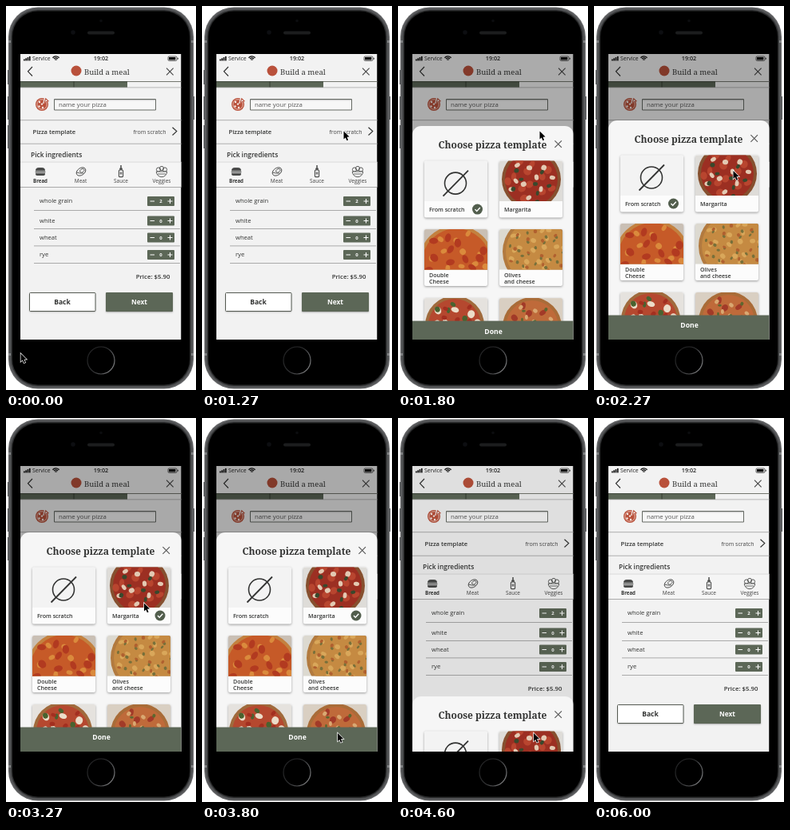
These frames come from a looping animation (238x480 px, 6.54 s). An HTML page with a canvas:

```html
<!DOCTYPE html>
<html lang="en">
<head>
<meta charset="utf-8">
<title>Build a meal</title>
<style>
html, body { margin: 0; width: 100%; height: 100%; overflow: hidden; background: #fff; }
canvas { display: block; width: 100vw; height: 100vh; }
</style>
</head>
<body>
<canvas id="stage"></canvas>
<script>
const W = 238, H = 480, LOOP = 6540;
const GREEN = '#5c6757', INK = '#333433', RED = '#b9513b', ICON = '#4b4c4b';
const SANS = '"Open Sans", "Noto Sans", sans-serif';
const SERIF = '"Noto Serif", serif';
const SCREEN = { x: 18, y: 60, w: 201.5, h: 357 };
const SHEET_TOP = 143, TRAVEL = 276;
const canvas = document.getElementById('stage');
const c = canvas.getContext('2d');

const clamp = p => Math.max(0, Math.min(1, p));
const span = (t, a, b) => clamp((t - a) / (b - a));
const easeOut = p => 1 - Math.pow(1 - p, 2.25);
const easeInOut = p => p * p * (3 - 2 * p);
const mix = (a, b, p) => a + (b - a) * p;

function rect(x, y, w, h, fill) {
  c.fillStyle = fill;
  c.fillRect(x, y, w, h);
}

function round(x, y, w, h, r, fill, stroke, lw = 1) {
  c.beginPath();
  c.roundRect(x, y, w, h, r);
  if (fill) { c.fillStyle = fill; c.fill(); }
  if (stroke) { c.strokeStyle = stroke; c.lineWidth = lw; c.stroke(); }
}

function ellipse(x, y, rx, ry, fill, stroke, lw = 1, turn = 0) {
  c.beginPath();
  c.ellipse(x, y, rx, ry, turn, 0, Math.PI * 2);
  if (fill) { c.fillStyle = fill; c.fill(); }
  if (stroke) { c.strokeStyle = stroke; c.lineWidth = lw; c.stroke(); }
}

const disc = (x, y, r, fill, stroke, lw) => ellipse(x, y, r, r, fill, stroke, lw);

function line(points, color, lw = 1) {
  c.beginPath();
  points.forEach(([x, y], i) => i ? c.lineTo(x, y) : c.moveTo(x, y));
  c.strokeStyle = color;
  c.lineWidth = lw;
  c.stroke();
}

function text(str, x, y, size, weight = 400, color = INK, align = 'left', family = SANS) {
  c.font = `${weight} ${size}px ${family}`;
  c.textAlign = align;
  c.fillStyle = color;
  c.fillText(str, x, y);
}

function shadowed(draw, color = 'rgba(0,0,0,.3)', blur = 2, dy = 1) {
  const k = canvas.width / W;
  c.save();
  c.shadowColor = color;
  c.shadowBlur = blur * k;
  c.shadowOffsetY = dy * k;
  draw();
  c.restore();
}

function clipped(x, y, w, h, draw, r = 0) {
  c.save();
  c.beginPath();
  c.roundRect(x, y, w, h, r);
  c.clip();
  draw();
  c.restore();
}

function cross(x, y, r, color = '#444') {
  line([[x - r, y - r], [x + r, y + r]], color, 1.1);
  line([[x - r, y + r], [x + r, y - r]], color, 1.1);
}

function gradient(x0, y0, x1, y1, ...colors) {
  const g = c.createLinearGradient(x0, y0, x1, y1);
  colors.forEach((color, i) => g.addColorStop(i / (colors.length - 1), color));
  return g;
}

function seeded(seed) {
  return () => (seed = (seed * 16807) % 2147483647) / 2147483647;
}

function drawPhone() {
  rect(0, 0, W, H, '#fff');
  [[80, 18], [113, 29], [149, 29]].forEach(([y, h]) => rect(2, y, 3, h, '#555658'));
  rect(233, 113, 3, 29, '#555658');
  round(3, 1.5, 232, 477, 37, '#626365');
  round(4.5, 3, 229, 474, 35.5, '#515254');
  round(6.5, 5, 225, 470, 33.5, '#2b2c2d');
  round(8, 6.5, 222, 467, 32, '#000');
  [43, 434].forEach(y => {
    rect(3, y, 3, 3, '#858688');
    rect(232, y, 3, 3, '#858688');
  });
  disc(119, 18.5, 1.8, '#0c0d0f');
  round(102, 31.5, 34, 4, 2, '#1c1d1e');
  disc(84, 33, 2.8, '#0d0e11');
  disc(119, 443, 17, '#000', gradient(104, 433, 135, 450, '#222324', '#303133', '#77787a'), 1.2);
}

function drawStatus() {
  for (let i = 0; i < 4; i++) rect(22 + i * 2.3, 66.5 - i * 1.2, 1.7, 1.9 + i * 1.2, '#111');
  text('Service', 33, 68.3, 6.8, 400, '#222');
  [1.4, 3.4, 5.4].forEach(r => {
    c.beginPath();
    c.arc(62.5, 68.3, r, -Math.PI * .77, -Math.PI * .23);
    c.strokeStyle = '#111';
    c.lineWidth = 1.3;
    c.stroke();
  });
  text('19:02', 119, 68.3, 7.2, 600, '#222', 'center');
  round(203, 63, 11, 5.4, 1.3, null, '#222', .7);
  rect(204, 64, 8.4, 3.4, '#111');
  rect(214.7, 64.8, 1, 1.8, '#111');
}

function drawHeader() {
  line([[33, 76], [27.5, 81.8], [33, 87.5]], INK, 1.2);
  disc(88, 81, 6.5, RED);
  text('Build a meal', 98, 86, 9.5, 400, INK, 'left', SERIF);
  cross(205.3, 82, 4.3);
  rect(18, 94, 202, 1, '#74776f');
  rect(18, 94, 134, 8, GREEN);
  rect(18, 94, 134, 1.2, '#474f43');
  rect(84.5, 94, 1, 8, '#343c31');
  rect(18, 101.5, 202, .8, '#aaa');
}

function drawNameRow() {
  disc(45, 123, 8, RED);
  disc(45, 123, 6.2, null, '#f0d6cd', .8);
  [[42, 120], [41.5, 125.5], [46, 127], [45, 122.6]].forEach(([x, y]) => disc(x, y, 1.2, '#f6ebe6'));
  c.beginPath();
  c.moveTo(46, 122);
  c.lineTo(48.5, 113.5);
  c.lineTo(54.5, 119);
  c.closePath();
  c.fillStyle = '#f4f4f4';
  c.fill();
  line([[48, 120.7], [49.7, 115.8], [53, 118.8], [48, 120.7]], RED, 1.1);
  round(60.5, 116.5, 127, 13.5, 0, '#f7f7f7', '#666a64', 1);
  rect(61, 117, 126, 1.2, '#c9c9c9');
  text('name your pizza', 66, 125.8, 7.8, 400, '#555');
}

function breadIcon(x, y) {
  round(x - 6, y - 5, 12, 4, [4, 4, 0, 0], ICON);
  rect(x - 6.3, y - .3, 12.6, 1.5, ICON);
  round(x - 6, y + 2, 12, 3, [0, 0, 2, 2], ICON);
}

function meatIcon(x, y) {
  ellipse(x + .5, y, 6.4, 4.4, null, ICON, 1, -.6);
  ellipse(x + 1.8, y - 1.2, 3, 2, null, ICON, .9, -.6);
  line([[x - 5, y + 1], [x - 1, y + 2], [x + 4, y + 2]], ICON, .9);
}

function sauceIcon(x, y) {
  line([[x, y - 8], [x, y - 4]], ICON, 1.5);
  round(x - 1.8, y - 4.6, 3.6, 2.4, .5, ICON);
  round(x - 2.6, y - 2, 5.2, 8.6, 1, null, ICON, 1.1);
  rect(x - 1.3, y + .5, 2.6, 3, '#777');
}

function veggieIcon(x, y) {
  [-4, 0, 4].forEach(dx => disc(x + dx, y - 2.5 - (dx ? 0 : 1.5), 2.6, null, ICON, .9));
  c.beginPath();
  c.arc(x, y, 6.7, 0, Math.PI);
  c.closePath();
  c.fillStyle = '#f5f5f5';
  c.fill();
  c.stroke();
  line([[x - 5, y + 3], [x + 5, y + 3]], ICON, .8);
}

function stepper(y, count) {
  round(177, y - 6, 34, 12, 1, GREEN);
  line([[180.5, y], [186, y]], '#fff', 1);
  line([[202.5, y], [208.5, y]], '#fff', 1);
  line([[205.5, y - 3], [205.5, y + 3]], '#fff', 1);
  text(String(count), 194, y + 2.2, 6, 700, '#fff', 'center');
}

function drawForm() {
  rect(18, 142.2, 202, 1, '#aeaeae');
  text('Pizza template', 33.5, 159.7, 7.6, 600);
  text('from scratch', 200.5, 159.7, 7, 400, '#444', 'right');
  line([[208.5, 151.7], [213.8, 156.6], [208.5, 161.5]], INK, 1.2);
  rect(18, 171.7, 202, 1, '#aeaeae');
  text('Pick ingredients', 31, 189, 8.4, 600);

  rect(18, 195, 202, 31, '#f5f5f5');
  rect(18, 194.7, 202, .7, '#cfcfcf');
  rect(18, 226, 202, 1, '#aaa');
  breadIcon(43, 207);
  meatIcon(93.5, 207);
  sauceIcon(144, 207);
  veggieIcon(195, 207);
  text('Bread', 43, 221.2, 6.1, 700, INK, 'center');
  [['Meat', 93.5], ['Sauce', 144], ['Veggies', 195]].forEach(([s, x]) =>
    text(s, x, 221.2, 6.5, 400, '#444', 'center'));

  [['whole grain', 244, 255], ['white', 268.5, 278], ['wheat', 289.5, 299.5], ['rye', 311, 321]]
    .forEach(([name, y, rule], i) => {
      text(name, 42, y + 2.4, 7.6);
      stepper(y, i ? 0 : 2);
      rect(35, rule, 183, .8, '#999');
    });

  text('Price: $5.90', 205.5, 341.3, 7.8, 600, INK, 'right');
  shadowed(() => round(29.5, 358.5, 82.5, 23, 1, '#fff'));
  round(29.5, 358.5, 82.5, 23, 1, null, '#555a52', 1);
  shadowed(() => round(125, 358, 84, 24, 1, GREEN));
  text('Back', 70.5, 373, 8.5, 700, INK, 'center');
  text('Next', 167, 373, 8.3, 700, '#fff', 'center');
}

// bits: color, size, count
const pizzas = {
  margarita: { bg: '#dedcd8', at: [40, 23, 37], crust: '#86502f', base: '#9c2f22',
    bits: [['#b8452f', 5, 12], ['#e3c9b2', 3.6, 11], ['#39482c', 3, 9]], seed: 41 },
  cheese: { bg: '#c9bfb4', at: [40, 42, 47], crust: '#c3813f', base: '#c65a28',
    bits: [['#da8a3c', 4, 16], ['#b23a20', 5.5, 17]], seed: 77 },
  olives: { bg: '#dcd9d0', at: [48, 28, 44], crust: '#b27a3f', base: '#c58a42',
    bits: [['#d9a75a', 3.5, 22], ['#77703a', 2.2, 26], ['#b0602f', 2.4, 16]], seed: 19 },
  greens: { bg: '#e5e2de', at: [38, 34, 37], crust: '#a06a3c', base: '#b5482f',
    bits: [['#ecdcc8', 5, 11], ['#49622f', 3.6, 10], ['#a32f20', 3.4, 9]], seed: 53 },
  salami: { bg: '#d9cfc2', at: [41, 36, 37], crust: '#a96c38', base: '#bf6a3a',
    bits: [['#a23a28', 4.5, 14], ['#d9a871', 3, 12], ['#5e672f', 2.4, 10]], seed: 91 }
};

function drawPizza(kind, x, y) {
  const p = pizzas[kind], [px, py, r] = p.at, rnd = seeded(p.seed * 9973);
  rect(x, y, 79, 51, p.bg);
  disc(x + px, y + py, r, p.crust);
  disc(x + px, y + py, r - 4, p.base);
  p.bits.forEach(([color, size, n]) => {
    const start = rnd() * 6;
    for (let i = 0; i < n; i++) {
      const a = start + i * 2.4 + rnd() * .8, d = (r - 7) * Math.sqrt((i + .6) / n);
      ellipse(x + px + Math.cos(a) * d, y + py + Math.sin(a) * d,
        size, size * (.6 + rnd() * .35), color, null, 0, rnd() * 3);
    }
  });
}

function checkMark(x, y, alpha) {
  if (!alpha) return;
  c.globalAlpha = alpha;
  disc(x, y, 6.5, '#525e4d');
  line([[x - 3, y], [x - .8, y + 2.3], [x + 3.3, y - 2.2]], '#fff', 1.4);
  c.globalAlpha = 1;
}

function card(x, y, labels, kind) {
  shadowed(() => round(x, y, 79, 71, 2, '#fcfcfc'), 'rgba(0,0,0,.38)', 3, 1);
  clipped(x, y, 79, 50.5, () => {
    if (kind) return drawPizza(kind, x, y);
    rect(x, y, 79, 51, '#f3f3f3');
    disc(x + 39, y + 28, 13.5, null, INK, 1.6);
    line([[x + 23.5, y + 44], [x + 55, y + 12]], INK, 1.8);
  }, [2, 2, 0, 0]);
  const first = labels.length > 1 ? 59.9 : 63.8;
  labels.forEach((s, i) => text(s, x + 6, y + first + i * 8, 7.1, 600));
}

function drawSheet(offset, picked) {
  c.save();
  c.translate(0, offset);
  round(18, SHEET_TOP, 202, 290, [11, 11, 0, 0], '#f6f6f6');
  text('Choose pizza template', 50.5, 171.3, 12, 700, INK, 'left', SERIF);
  cross(200.7, 165.5, 4.3, '#555');
  card(33, 186.5, ['From scratch']);
  card(127, 186.5, ['Margarita'], 'margarita');
  card(33, 272, ['Double', 'Cheese'], 'cheese');
  card(127, 272, ['Olives', 'and cheese'], 'olives');
  card(33, 358, [], 'greens');
  card(127, 358, [], 'salami');
  checkMark(99.5, 247, 1 - picked);
  checkMark(193, 247, picked);
  rect(18, 386.5, 202, 40, GREEN);
  text('Done', 119.5, 402.4, 8.6, 700, '#fff', 'center');
  c.restore();
}

// Each move: start, end, target x, target y.
const moves = [
  [70, 670, 115, 271],
  [870, 1270, 177.5, 156.5],
  [1950, 2470, 173, 230],
  [3240, 3800, 170, 394]
];

function drawCursor(t) {
  const alpha = 1 - span(t, 5270, 5600);
  if (!alpha) return;
  let x = 18.5, y = 434.5;
  for (const [a, b, tx, ty] of moves) {
    const p = easeInOut(span(t, a, b));
    x = mix(x, tx, p);
    y = mix(y, ty, p);
  }
  c.save();
  c.globalAlpha = alpha;
  c.translate(x, y);
  c.beginPath();
  [[0, 0], [0, 10], [2.3, 8], [3.9, 11.7], [5.6, 11], [4, 7.3], [7.1, 7.1]].forEach(p => c.lineTo(...p));
  c.closePath();
  c.fillStyle = '#000';
  c.strokeStyle = '#fff';
  c.lineWidth = 1.4;
  c.stroke();
  c.fill();
  c.restore();
}

function draw(t) {
  const open = easeOut(span(t, 1560, 1860)) - easeOut(span(t, 4465, 4765));
  drawPhone();
  clipped(SCREEN.x, SCREEN.y, SCREEN.w, SCREEN.h, () => {
    rect(SCREEN.x, SCREEN.y, SCREEN.w, SCREEN.h, '#f2f2f2');
    drawStatus();
    drawHeader();
    drawNameRow();
    drawForm();
    if (open > 0) {
      rect(SCREEN.x, SCREEN.y, SCREEN.w, SCREEN.h, `rgba(0,0,0,${.3 * open})`);
      drawSheet(TRAVEL * (1 - open), span(t, 2840, 3000));
    }
  });
  drawCursor(t);
}

function frame(now) {
  const k = window.devicePixelRatio || 1;
  const w = Math.round(innerWidth * k), h = Math.round(innerHeight * k);
  if (canvas.width !== w || canvas.height !== h) {
    canvas.width = w;
    canvas.height = h;
  }
  c.setTransform(w / W, 0, 0, h / H, 0, 0);
  draw(now % LOOP);
  requestAnimationFrame(frame);
}
requestAnimationFrame(frame);
</script>
</body>
</html>
```
